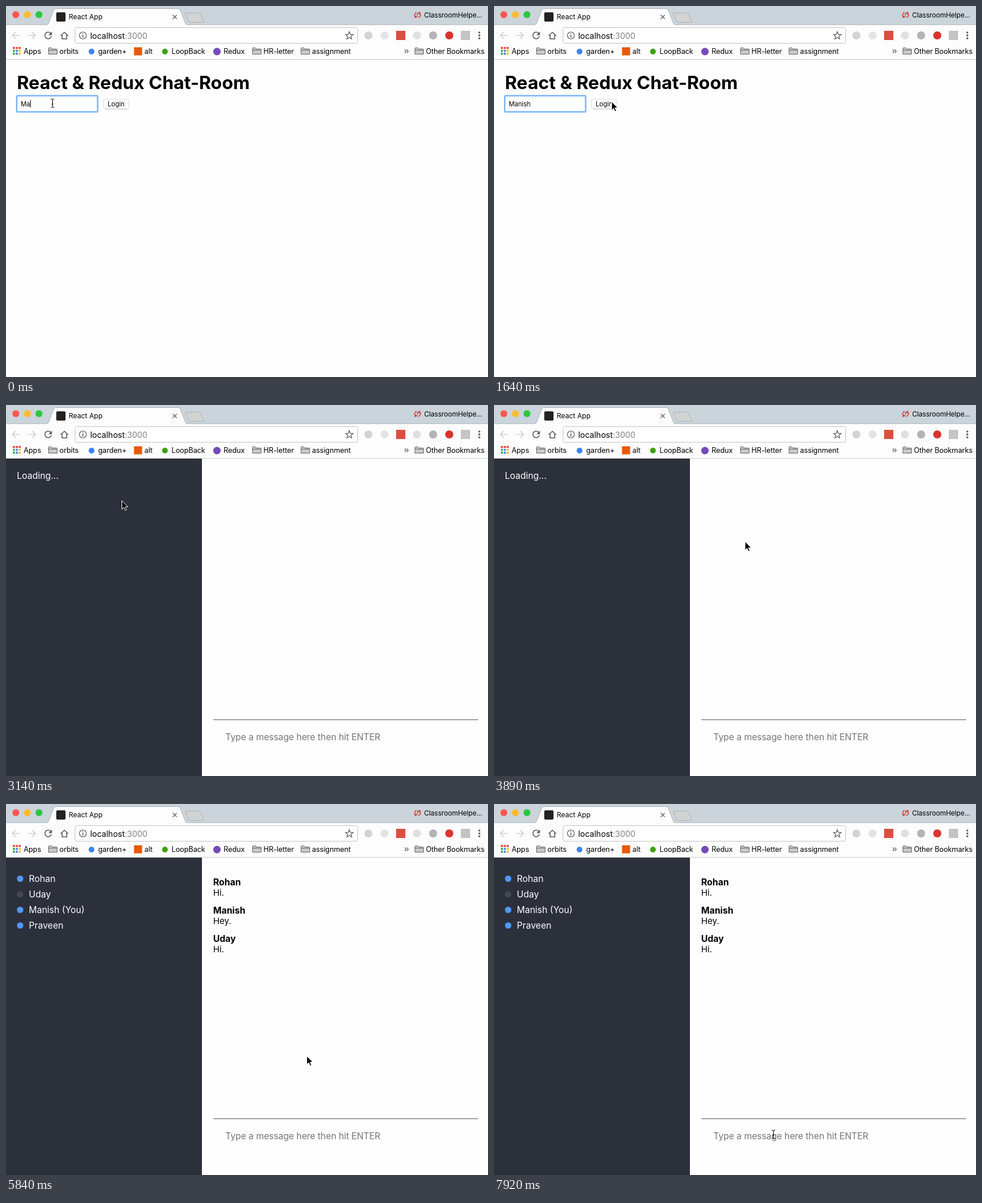
An HTML page that plays this animation: 834 by 643 pixels, repeating every 8000 ms.

```html
<!DOCTYPE html>
<html lang="en">
<head>
<meta charset="utf-8">
<title>Chat room login</title>
<style>
  html, body { margin: 0; width: 100%; height: 100%; overflow: hidden; background: #fefefe; }
  svg { display: block; width: 834px; height: 643px; }
  text { font: 15.5px Inter, "Open Sans", sans-serif; fill: #000; white-space: pre; }
  .tab { font-size: 12px; }
  .profile { font-size: 11.8px; letter-spacing: -.1px; }
  .url { font-size: 14px; }
  .bookmarks text { font-size: 12.5px; letter-spacing: -.1px; }
  .title { font-size: 31.5px; font-weight: 700; }
  .control { font-size: 11.1px; }
  .light { fill: #fff; }
  .hint { fill: #757575; letter-spacing: -.08px; }
  .author { font-weight: 700; }
  .message { font-size: 14.8px; }
  .line { fill: none; stroke: #5a5a5a; stroke-width: 1.6; }
  .thin { stroke-width: 1.2; }
  .off { stroke: #cfcfcf; }
</style>
</head>
<body>
<svg viewBox="0 0 834 643">
  <defs>
    <g id="folder" stroke="#666" fill="#c9c9c9">
      <path d="M.5 11.5V1.5Q.5 .5 1.5 .5H5.5L7 2.5H14.5Q15.5 2.5 15.5 3.5V11.5Z"/>
      <path d="M.5 4.5H15.5" fill="none"/>
    </g>
    <path id="back" class="line off" d="M6.5 0H-6M0-6L-6 0L0 6"/>
    <g id="syncHalf">
      <path d="M-1.8 -4.6A5 5 0 0 0 -3.4 3.6" fill="none" stroke="#cf2e27" stroke-width="1.5"/>
      <path d="M-5.8 4.8H-1.6V.8Z" fill="#cf2e27"/>
    </g>
  </defs>

  <g id="login">
    <text class="title" x="19" y="144">React &amp; Redux Chat-Room</text>
    <rect x="19.5" y="156.5" width="138" height="26" fill="#fff" stroke="#d8d8d8"/>
    <g id="focus" fill="none">
      <rect x="18.5" y="155.5" width="140" height="28" rx="1.5" stroke="#9cc8fb" stroke-width="3"/>
      <rect x="18.5" y="155.5" width="140" height="28" rx="1" stroke="#74b0f5"/>
    </g>
    <text id="name" class="control" x="25.5" y="174"></text>
    <rect id="nameCaret" y="163" width="1" height="13"/>
    <rect x="168.5" y="161.5" width="44" height="17" rx="3" fill="#fff" stroke="#dcdcdc"/>
    <path d="M171 178.5H210" stroke="#bdbdbd"/>
    <text class="control" x="176" y="174">Login</text>
  </g>

  <g id="room">
    <rect y="93" width="339" height="550" fill="#2c303b"/>
    <text id="loading" class="light" x="18.8" y="128">Loading...</text>
    <g id="people"></g>
    <path d="M359 545.5H817" stroke="#555"/>
    <text class="hint" x="379.5" y="581">Type a message here then hit ENTER</text>
    <rect id="hintCaret" x="379" y="566" width="1" height="18"/>
  </g>

  <g id="browser">
    <rect width="834" height="33" fill="#cad4da"/>
    <rect y="32" width="834" height="61" fill="#fdfdfd"/>
    <path d="M0 32.5H834" stroke="#b3bcc1"/>
    <path d="M0 92.5H834" stroke="#cbcbcb"/>
    <path d="M70 33.5Q73 32 74 29L82.5 7Q83.5 4.500 86 4.500H298Q300.500 4.500 301.500 7L310 29Q311 32 314 33.500" fill="#fdfdfd"/>
    <path d="M70 32.5Q73 32 74 29L82.5 7Q83.5 4.500 86 4.500H298Q300.500 4.500 301.500 7L310 29Q311 32 314 32.500" fill="none" stroke="#aab3b8"/>
    <path d="M312 12.500H334Q336 12.500 337 14.500L342 26Q343 28.500 341 28.500H319Q317 28.500 316 26.500L310.500 14.500Q310 12.500 312 12.500Z" fill="#d2d3d3" stroke="#adb2b5"/>
    <g id="lights"></g>
    <rect x="87" y="11" width="16" height="16" rx="2" fill="#222"/>
    <text class="tab" x="108.500" y="23">React App</text>
    <path class="line thin" d="M288.500 15.500L295.500 22.500M295.500 15.500L288.500 22.500"/>
    <use href="#syncHalf" x="712" y="15.500"/>
    <use href="#syncHalf" transform="translate(712 15.500) rotate(180)"/>
    <path d="M712 11.500V16.500M712 18V19.500" stroke="#cf2e27" stroke-width="1.400"/>
    <text class="profile" x="723.500" y="20">ClassroomHelpe...</text>

    <use href="#back" x="17" y="51"/>
    <use href="#back" transform="translate(45 51) scale(-1 1)"/>
    <path class="line" d="M77.500 47.500A5.700 5.700 0 1 0 78.500 52.500"/>
    <path d="M79.500 44.500V50.500H73.500Z" fill="#5a5a5a"/>
    <path class="line" d="M94.500 51.500L101 45.500L107.500 51.500M97 50V57H105V50"/>
    <rect x="119.500" y="37.500" width="489" height="27" rx="3" fill="#fff" stroke="#c2c2c2"/>
    <circle class="line thin" cx="133" cy="51" r="6"/>
    <path class="line" d="M133 47.300V48.800M133 50V54.500"/>
    <text class="url" x="145.700" y="56.500">localhost<tspan fill="#808080">:3000</tspan></text>
    <path id="star" class="line thin"/>
    <g id="extensions"></g>
    <g id="menu"></g>

    <g class="bookmarks">
      <g id="apps"></g>
      <circle cx="148" cy="79" r="5" fill="#3b82f0"/>
      <rect x="221.500" y="71.500" width="14" height="14" fill="#e8590c"/>
      <circle cx="275" cy="79" r="5" fill="#3fa10c"/>
      <circle cx="365" cy="79" r="6.500" fill="#764abc"/>
      <g id="labels"></g>
      <path class="line thin" d="M690 75.500L692.500 78.500L690 81.500M693.500 75.500L696 78.500L693.500 81.500"/>
    </g>
  </g>

  <path id="arrow" d="M.5 .8V15.500L3.900 12.400L6.200 17.700L8.600 16.700L6.300 11.500H11Z" fill="#000" stroke="#fff"/>
  <path id="beam" d="M-3 -7.500Q0 -7.500 0 -5.500Q0 -7.500 3 -7.500M0 -5.500V5.500M-3 7.500Q0 7.500 0 5.500Q0 7.500 3 7.500M-1.500 1.500H1.500" fill="none" stroke="#000"/>
</svg>
<script>
const LOOP = 8000;
const $ = id => document.getElementById(id);
const show = (id, on) => $(id).setAttribute('visibility', on ? 'inherit' : 'hidden');

function add(parent, tag, attrs, text) {
  const el = document.createElementNS('http://www.w3.org/2000/svg', tag);
  for (const key in attrs) el.setAttribute(key, attrs[key]);
  if (text) el.textContent = text;
  $(parent).append(el);
}
const dot = (parent, cx, cy, r, fill) => add(parent, 'circle', { cx, cy, r, fill });

// Browser chrome
['#fc5652', '#fdbc2f', '#29c740'].forEach((fill, i) => dot('lights', 17 + 20 * i, 15, 6, fill));
[46, 51, 56].forEach(y => dot('menu', 819, y, 1.7, '#5a5a5a'));

const starPoints = Array.from({ length: 10 }, (_, i) => {
  const r = i % 2 ? 3 : 7, a = Math.PI * (i / 5 - .5);
  return `${594 + r * Math.cos(a)} ${51.5 + r * Math.sin(a)}`;
});
$('star').setAttribute('d', `M${starPoints.join('L')}Z`);

const [red, yellow, green, blue] = ['#e8453c', '#f9bb2d', '#3aa757', '#4688f1'];
[red, red, red, green, blue, yellow, green, blue, yellow].forEach((fill, i) => add('apps', 'rect', {
  x: 12 + i % 3 * 5, y: 71 + Math.floor(i / 3) * 5, width: 3.5, height: 3.5, fill
}));

[['circle', '#d4d4d4'], ['circle', '#e4e4e4'], ['square', '#d9503f'], ['circle', '#e0e0e0'],
 ['circle', '#b4b4b4'], ['circle', '#d8342c'], ['square', '#c4c4c4']].forEach(([shape, fill], i) => {
  const x = 627 + 28 * i;
  if (shape === 'circle') dot('extensions', x, 51, 7, fill);
  else add('extensions', 'rect', { x: x - 8, y: 43, width: 16, height: 16, fill });
});

[[30.5, 'Apps'], [92.5, 'orbits'], [159.5, 'garden+'], [239.5, 'alt'], [286.5, 'LoopBack'],
 [376.5, 'Redux'], [445.5, 'HR-letter'], [529.5, 'assignment'], [726.5, 'Other Bookmarks']]
  .forEach(([x, label]) => add('labels', 'text', { x, y: 83 }, label));
[73, 426, 510, 707].forEach(x => add('labels', 'use', { href: '#folder', x, y: 72 }));

// Chat room
['Rohan', 'Uday', 'Manish (You)', 'Praveen'].forEach((user, i) => {
  dot('people', 24.5, 129.5 + 27 * i, 5.5, i === 1 ? '#434754' : '#4f98ff');
  add('people', 'text', { x: 39.5, y: 135 + 27 * i, class: 'light' }, user);
});
[['Rohan', 'Hi.'], ['Manish', 'Hey.'], ['Uday', 'Hi.']].forEach(([author, message], i) => {
  add('people', 'text', { x: 358.5, y: 141 + 49 * i, class: 'author' }, author);
  add('people', 'text', { x: 358.5, y: 159 + 49 * i, class: 'message' }, message);
});

// Time, then the value held from there on
const typed = [[0, 2], [150, 3], [300, 4], [600, 5], [750, 6]];
const pointer = [
  [0, 'beam', 80.5, 168.5], [1200, 'beam', 140.5, 168.5], [1350, 'arrow', 206, 164],
  [1640, 'arrow', 203, 165], [1790, 'arrow', 200, 165],
  [3290, 'arrow', 235, 167], [3440, 'arrow', 294, 172], [3590, 'arrow', 342, 181],
  [3890, 'arrow', 434, 236], [4040, 'arrow', 513, 303],
  [4340, 'arrow', 520, 350], [4490, 'arrow', 524, 393], [4790, 'arrow', 520, 436],
  [6290, 'arrow', 517, 450], [6440, 'arrow', 508, 484], [6590, 'arrow', 497, 524],
  [6740, 'beam', 488.5, 562.5], [6880, 'beam', 485.5, 572.5],
  [7170, 'beam', 488.5, 572.5], [7320, 'beam', 483.5, 572.5]
];
const held = (steps, t) => steps.findLast(([start]) => start <= t);

function draw(t) {
  const inRoom = t >= 3140, loaded = t >= 5840;
  show('login', !inRoom);
  show('room', inRoom);
  show('loading', inRoom && !loaded);
  show('people', loaded);
  show('focus', t < 1790);
  show('nameCaret', t < 1350);
  show('hintCaret', t >= 7320 && t < 7920);

  $('name').textContent = 'Manish'.slice(0, held(typed, t)[1]);
  $('nameCaret').setAttribute('x', Math.round(25.5 + $('name').getComputedTextLength()));

  const [, shape, x, y] = held(pointer, t);
  for (const id of ['arrow', 'beam']) show(id, id === shape);
  $(shape).setAttribute('transform', `translate(${x} ${y})`);
}

const started = performance.now();
function tick() {
  draw((performance.now() - started) % LOOP);
  requestAnimationFrame(tick);
}
tick();
</script>
</body>
</html>
```
